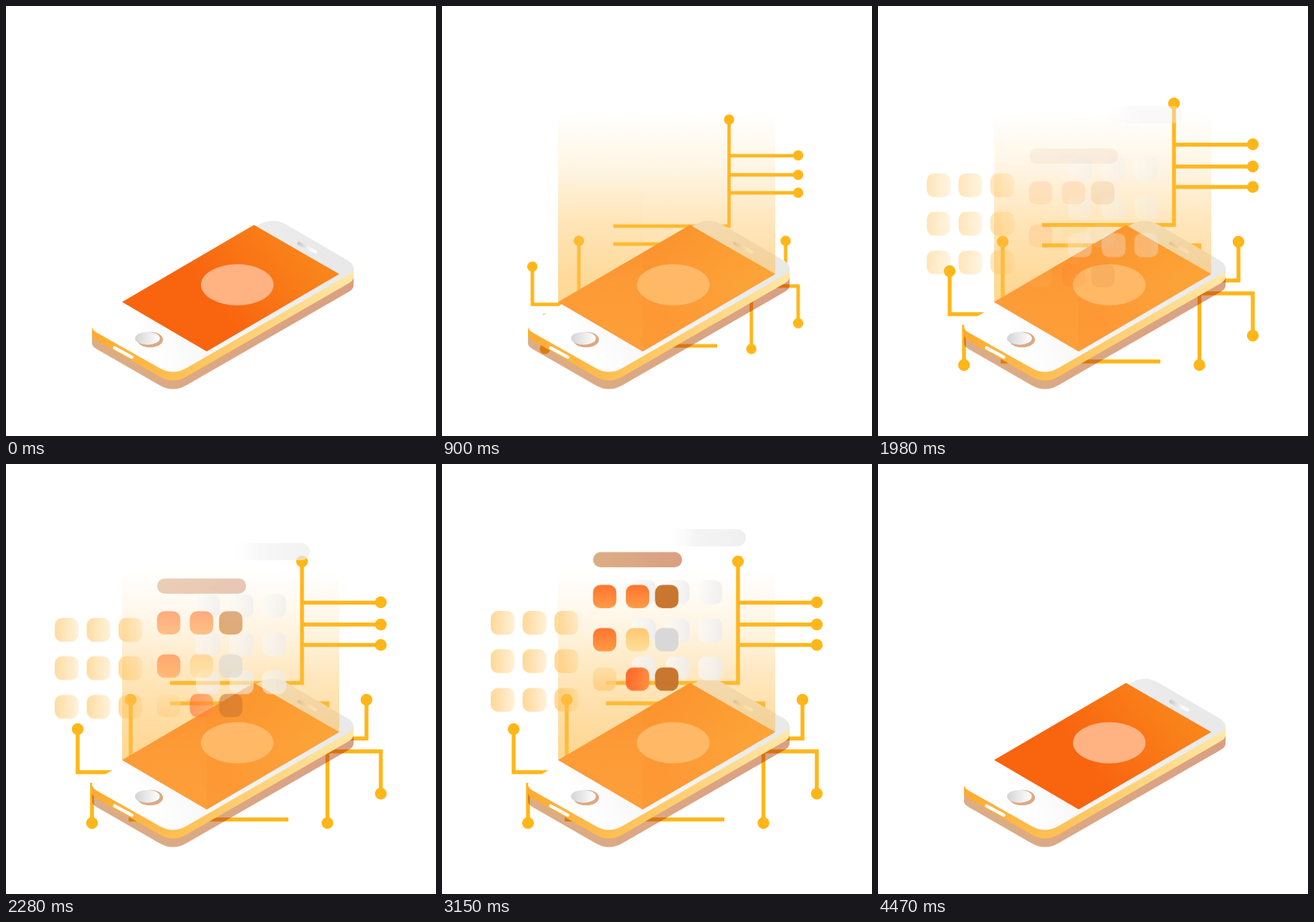
Recreate the animation shown at these times as an HTML page. Size 600 by 600 pixels, loop 4.5 s.

```html
<!DOCTYPE html>
<html lang="en">
<head>
<meta charset="utf-8">
<title>Phone projection</title>
<style>
  html, body { margin: 0; width: 100%; height: 100%; overflow: hidden; background: #fff; }
  svg { display: block; width: 100vw; height: 100vh; }
  #wires { transform-origin: 311.5px 318.5px; }
  #wires path { fill: none; stroke: #ffb618; stroke-width: 5.4; }
  #wires circle { fill: #ffb618; }
  #glow { transform-origin: 0 482px; }
</style>
</head>
<body>
<svg viewBox="0 0 600 600">
  <defs>
    <linearGradient id="face" gradientUnits="userSpaceOnUse" x1="190" y1="470" x2="430" y2="330">
      <stop offset="0" stop-color="#fff"/><stop offset=".25" stop-color="#f8f8f8"/><stop offset="1" stop-color="#e9e9e9"/>
    </linearGradient>
    <linearGradient id="side" gradientUnits="userSpaceOnUse" x1="120" y1="0" x2="485" y2="0">
      <stop offset="0" stop-color="#ffab2e"/><stop offset=".4" stop-color="#ffc45c"/><stop offset="1" stop-color="#ffe8a6"/>
    </linearGradient>
    <linearGradient id="shade" gradientUnits="userSpaceOnUse" x1="120" y1="0" x2="485" y2="0">
      <stop offset="0" stop-color="#dcae85"/><stop offset="1" stop-color="#da9f83"/>
    </linearGradient>
    <linearGradient id="screen" gradientUnits="userSpaceOnUse" x1="285" y1="410" x2="405" y2="320">
      <stop offset="0" stop-color="#f9640f"/><stop offset="1" stop-color="#f9851b"/>
    </linearGradient>
    <linearGradient id="knob"><stop offset="0" stop-color="#d4d4d4"/><stop offset="1" stop-color="#fff"/></linearGradient>
    <linearGradient id="speaker" gradientUnits="userSpaceOnUse" x1="407" y1="0" x2="434" y2="0">
      <stop offset="0" stop-color="#c6c6c6"/><stop offset=".6" stop-color="#f6f6f6"/><stop offset="1" stop-color="#fff"/>
    </linearGradient>
    <linearGradient id="beam" x2="0" y2="1">
      <stop offset="0" stop-color="#ffbe50" stop-opacity="0"/>
      <stop offset=".25" stop-color="#ffbe50" stop-opacity=".17"/>
      <stop offset=".45" stop-color="#ffbe50" stop-opacity=".38"/>
      <stop offset=".72" stop-color="#ffbe50" stop-opacity=".57"/>
      <stop offset="1" stop-color="#ffbe50" stop-opacity=".6"/>
    </linearGradient>
    <linearGradient id="beamLeft" x2="0" y2="1">
      <stop offset=".2" stop-color="#ffc860" stop-opacity="0"/><stop offset="1" stop-color="#ffc860" stop-opacity=".11"/>
    </linearGradient>
    <linearGradient id="amber">
      <stop offset="0" stop-color="#ffbe50" stop-opacity=".6"/><stop offset="1" stop-color="#ffbe50" stop-opacity=".22"/>
    </linearGradient>
    <linearGradient id="mist">
      <stop offset="0" stop-color="#fafafa" stop-opacity=".65"/><stop offset="1" stop-color="#ececee" stop-opacity=".8"/>
    </linearGradient>
    <linearGradient id="mistBar">
      <stop offset="0" stop-color="#fff" stop-opacity="0"/><stop offset=".35" stop-color="#f4f4f4" stop-opacity=".9"/><stop offset="1" stop-color="#eee" stop-opacity=".9"/>
    </linearGradient>
    <linearGradient id="tan"><stop offset="0" stop-color="#dcae85"/><stop offset="1" stop-color="#da9f83"/></linearGradient>
    <linearGradient id="orange" x2="0" y2="1"><stop offset="0" stop-color="#ff7430"/><stop offset="1" stop-color="#ff9c45"/></linearGradient>
    <linearGradient id="ember" x2="1" y2=".2"><stop offset="0" stop-color="#ff642a"/><stop offset="1" stop-color="#ff8c40"/></linearGradient>
    <linearGradient id="honey" x2="0" y2="1"><stop offset="0" stop-color="#ffc872"/><stop offset="1" stop-color="#ffe09a"/></linearGradient>
    <linearGradient id="cream" x2="0" y2="1">
      <stop offset="0" stop-color="#ffdb9c" stop-opacity=".75"/><stop offset="1" stop-color="#ffc877" stop-opacity=".75"/>
    </linearGradient>
    <path id="slab" d="M120 447Q121 443 127 440L353 305Q372 294.5 391 305L477 355Q485 360 485 366Q485 371 478 375L252 505Q233 516 214 505L127 456Q120 452 120 447Z"/>
    <path id="edge" d="M120 447V459Q120 463 127 467L214 517Q233 528 252 517L478 387Q485 383 485 378V366L233 450Z"/>
    <clipPath id="column"><path d="M162 0V413L280 482L465 374V0Z"/></clipPath>
  </defs>
  <rect width="600" height="600" fill="#fff"/>

  <g class="fade"><g id="wires"></g></g>

  <use href="#edge" y="12" fill="url(#shade)" style="mix-blend-mode:multiply"/>
  <use href="#edge" fill="url(#side)"/>
  <use href="#slab" fill="url(#face)"/>
  <path d="M162 413L346 305.500L465 374L280 482Z" fill="url(#screen)"/>
  <ellipse cx="322.700" cy="389" rx="50.700" ry="28.700" fill="#ffb282"/>
  <ellipse cx="201" cy="465.500" rx="18" ry="10.800" fill="#dba985"/>
  <ellipse cx="197.300" cy="463.700" rx="17.300" ry="9" fill="url(#knob)"/>
  <path d="M151.500 477L175.500 490" stroke="#fff" stroke-width="4.600" stroke-linecap="round"/>
  <path d="M409 331.500L431.500 343" stroke="url(#speaker)" stroke-width="5" stroke-linecap="round"/>

  <g class="fade">
    <g clip-path="url(#column)">
      <g id="glow">
        <rect x="162" y="150" width="303" height="332" fill="url(#beam)"/>
        <rect x="162" y="150" width="118" height="332" fill="url(#beamLeft)"/>
      </g>
    </g>
    <g id="left"></g>
    <g id="back"></g>
    <g id="front"></g>
  </g>
</svg>
<script>
const LOOP = 4500;
const $ = id => document.getElementById(id);
const rect = (x, y, w, h, r, fill) =>
  `<rect x="${x}" y="${y}" width="${w}" height="${h}" rx="${r}" fill="${fill}"/>`;

// Rounded tiles; pick(row, col) gives the fill
const grid = (xs, ys, size, pick) =>
  ys.map((y, r) => xs.map((x, c) => rect(x, y, size, size, 10.5, pick(r, c))).join('')).join('');

const lines = [
  'M413 136V305.5H229', 'M413 193.500H523', 'M413 224H523', 'M413 252.500H523',
  'M229 334H448.500V501', 'M523 460V401H446', 'M503 329V383H460',
  'M174 329V496H394', 'M100 370V430H170', 'M120 501V445'
];
const dots = [
  [413, 136], [523, 193], [523, 224], [523, 252.5], [448.5, 501],
  [523, 460], [503, 329], [174, 329], [100, 370], [120, 501]
];
$('wires').innerHTML =
  lines.map(d => `<path d="${d}"/>`).join('') +
  dots.map(([x, y]) => `<circle cx="${x}" cy="${y}" r="8.200"/>`).join('');

$('left').innerHTML = grid([68, 112.5, 157], [205, 258.5, 312.5], 33.3, () => 'url(#amber)');

$('back').innerHTML = rect(312, 91, 112, 24, 12, 'url(#mistBar)') +
  grid([265, 312, 357.5], [162, 215.5, 268.5], 33.5, () => 'url(#mist)');

const brown = '#c87630';
const fills = [
  ['url(#orange)', 'url(#orange)', brown],
  ['url(#orange)', 'url(#honey)', '#d8d8d8'],
  ['url(#cream)', 'url(#ember)', brown]
];
$('front').innerHTML = rect(211, 122.7, 124, 21.3, 10.6, 'url(#tan)') +
  grid([210.7, 256.5, 297.3], [168.5, 228.7, 283.7], 32.6, (r, c) => fills[r][c]);

// Holds `from`, changes between start and end, then holds `to`
function play(el, start, end, from, to, easing) {
  el.animate([
    { ...from, offset: 0 },
    { ...from, offset: start / LOOP, easing },
    { ...to, offset: end / LOOP },
    { ...to, offset: 1 }
  ], { duration: LOOP, iterations: Infinity });
}

play($('glow'), 10, 860, { transform: 'scaleY(0)' }, { transform: 'scaleY(1)' }, 'ease');
play($('wires'), 410, 1245, { transform: 'scale(0)' }, { transform: 'scale(1)' }, 'ease');

for (const [id, start] of [['left', 1420], ['back', 1600], ['front', 1804]])
  play($(id), start, start + 1420,
    { transform: 'translateY(88px)', opacity: 0 },
    { transform: 'translateY(0px)', opacity: 1 }, 'ease');

for (const el of document.querySelectorAll('.fade'))
  play(el, 4000, 4470, { opacity: 1 }, { opacity: 0 }, 'linear');
</script>
</body>
</html>
```
